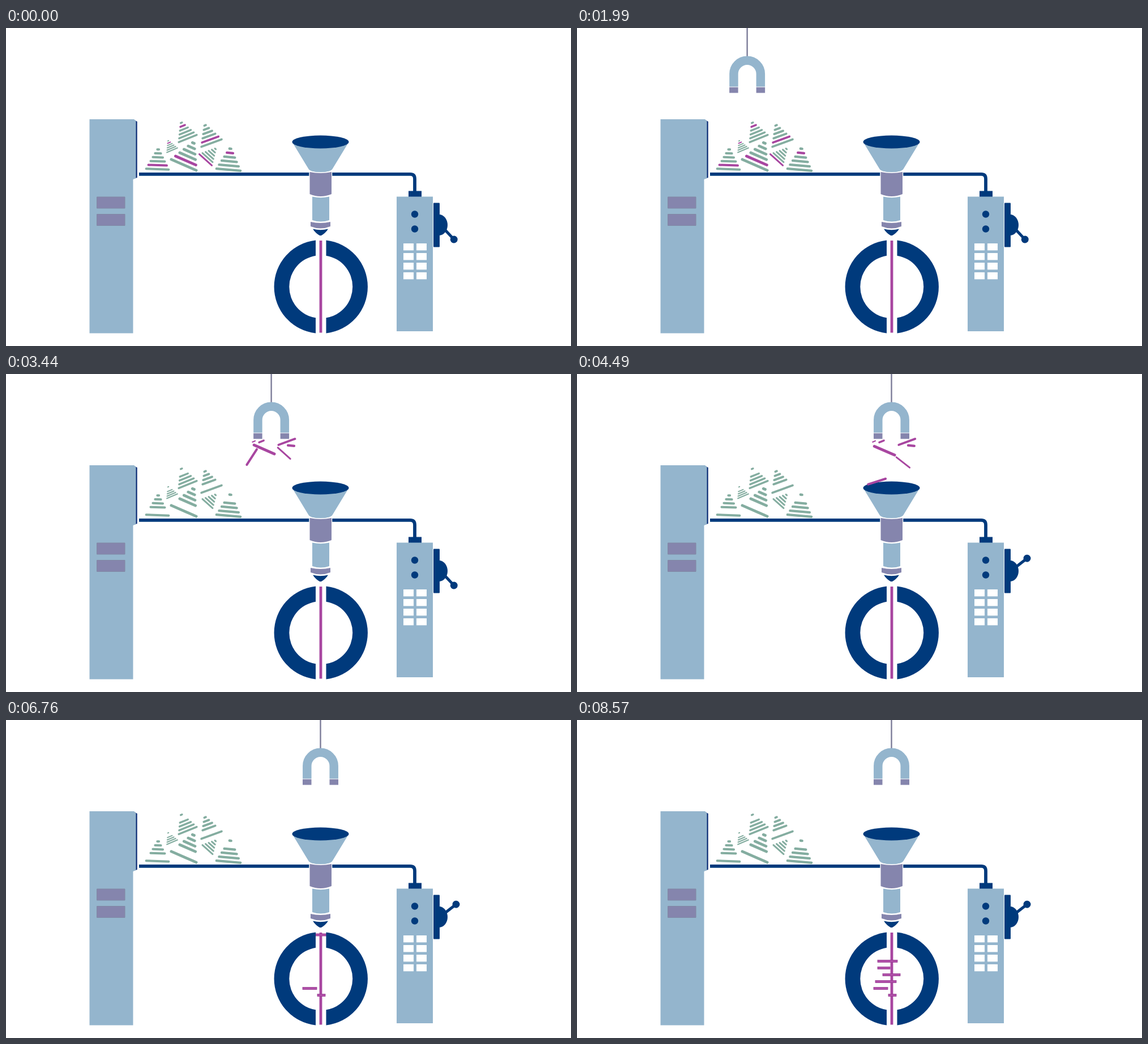
Write an HTML page that moves like this. It is 998 px wide and 561 px high and loops after 8670 ms.

```html
<!DOCTYPE html>
<html lang="en">
<head>
<meta charset="utf-8">
<title>Magnet and funnel</title>
<style>
  html, body { margin: 0; height: 100%; overflow: hidden; background: #fff; }
  svg { display: block; width: 100vw; height: 100vh; }
  .sky { fill: #94b5cd; }
  .navy { fill: #003a7c; }
  .plum { fill: #8585ad; }
  .edge { stroke: #fff; stroke-width: 2.5; paint-order: stroke; }
</style>
</head>
<body>
<svg viewBox="0 0 998 561">
  <!-- hides sticks once they are inside the funnel -->
  <clipPath id="mouth"><path d="M0 0H998V201H605.500A50 11.500 0 0 1 505.500 201H470V561H0Z"/></clipPath>

  <!-- left cabinet -->
  <path fill="#0a2a74" d="M224 161L231.700 165V264L224 266.500Z"/>
  <path class="sky" d="M147.500 161H226L229.500 164V265L224.500 267V538.500H147.500Z"/>
  <path class="plum" stroke="#8088a4" d="M160.500 298H210V318H160.500ZM160.500 328.500H210V348.500H160.500Z"/>

  <!-- pipe and right cabinet -->
  <path d="M235 257.800H714Q722 257.800 722 266V290" fill="none" stroke="#003a7c" stroke-width="5.800"/>
  <path class="navy" d="M711 287.500H734V298H711Z"/>
  <path class="sky" d="M690 297.500H754V535H690Z"/>
  <circle class="navy" cx="722" cy="328.500" r="6.200"/>
  <circle class="navy" cx="722" cy="354.500" r="6.200"/>
  <g id="keys" fill="#fff"></g>
  <rect class="navy" x="755" y="308.500" width="11" height="78" rx="1"/>
  <path class="navy" d="M765 329A15 18.500 0 0 1 765 366Z"/>
  <g id="lever">
    <path d="M767 347H802" stroke="#003a7c" stroke-width="5"/>
    <circle class="navy" cx="802.500" cy="347" r="6.500"/>
  </g>

  <g id="piles" stroke-linecap="round" stroke="#84ada0"></g>

  <!-- magnet -->
  <g id="magnet">
    <path d="M0 0V51" stroke="#80809c" stroke-width="2.500"/>
    <path d="M-23.700 103.500V81A23.700 23.700 0 0 1 23.700 81V103.500" fill="none" stroke="#94b5cd" stroke-width="15.500"/>
    <path class="plum" d="M-31.500 104.500H-16V114.500H-31.500ZM16 104.500H31.500V114.500H16Z"/>
  </g>

  <!-- funnel -->
  <path class="sky" d="M506 202L534 248Q537 254 555.500 254.500Q574 254 577 248L605 202Z"/>
  <ellipse class="navy" cx="555.500" cy="201" rx="50" ry="11.500"/>
  <g clip-path="url(#mouth)"><g id="sticks" stroke-linecap="round" stroke="#a846a0"></g></g>
  <path class="plum edge" d="M536.500 254Q555.500 258 575 254V293Q555.500 301 536.500 293Z"/>
  <path class="sky edge" d="M541 297.500Q556 301 571 297.500V339Q556 344 541 339Z"/>
  <path class="plum edge" d="M538 342Q555.500 346 573 342V350Q555.500 357 538 350Z"/>
  <path class="navy" d="M542 354.500Q555.500 358 569 354.500Q565 361 558 365.500Q555.500 367 553 365.500Q546 361 542 354.500Z"/>

  <!-- ring -->
  <path d="M556 375V537.500" stroke="#a846a0" stroke-width="4.800"/>
  <g id="bars" fill="#b04fa8" stroke="#963c91" stroke-width=".8"></g>
  <path class="navy" d="M547 374.500A82.500 82.500 0 0 0 547 538.500V511.300A55.500 55.500 0 0 1 547 401.700Z
    M565.500 374.500A82.500 82.500 0 0 1 565.500 538.500V511.300A55.500 55.500 0 0 0 565.500 401.700Z"/>
</svg>
<script>
const LOOP = 8670, ROWS = 6, STOP = 329, FUNNEL = 555.5, RAD = Math.PI / 180;
const $ = id => document.getElementById(id);
const add = (parent, tag, attrs) => {
  const el = document.createElementNS('http://www.w3.org/2000/svg', tag);
  for (const k in attrs) el.setAttribute(k, attrs[k]);
  return parent.appendChild(el);
};
const place = (el, x, y, a = 0) => el.setAttribute('transform', `translate(${x} ${y}) rotate(${a})`);
const mix = (a, b, u) => a + (b - a) * u;
const ease = (t, start, span) =>
  (1 - Math.cos(Math.PI * Math.min(1, Math.max(0, (t - start) / span)))) / 2;

for (let i = 0; i < 8; i++)
  add($('keys'), 'rect', { x: 702 + i % 2 * 23, y: 380 + (i >> 1) * 17, width: 18, height: 12.3 });

// piles in the order their pink sticks drop into the funnel
const piles = [
  { x: 267.5, y: 249, tilt: 2, size: 43, pink: 1, swing: -59 },
  { x: 352.5, y: 232.5, tilt: 42, size: 32, pink: 0 },
  { x: 314, y: 241.5, tilt: 23.6, size: 52, pink: 1 },
  { x: 393, y: 250, tilt: 5, size: 46, pink: 4 },
  { x: 363, y: 203, tilt: -20, size: 41, pink: 1 },
  { x: 321, y: 195, tilt: -22, size: 37, pink: 4 },
  { x: 293.5, y: 215.5, tilt: -23, size: 22, pink: 4 }
];

const sticks = piles.map(({ x, y, tilt, size, pink, swing = 0 }, order) => {
  const row = (group, r) => {
    const u = r / (ROWS - 1), rise = size * .81 * u;
    const len = size * mix(1, .14, u), width = size * .093;
    const half = (len - width * .8) / 2;
    const el = add(group, 'path', { d: `M${-half} 0H${half}`, 'stroke-width': width });
    const at = { el, len, x: x + Math.sin(tilt * RAD) * rise, y: y - Math.cos(tilt * RAD) * rise };
    place(el, at.x, at.y, tilt);
    return at;
  };
  for (let r = 0; r < ROWS; r++) if (r !== pink) row($('piles'), r);
  const s = row($('sticks'), pink);
  return {
    ...s, tilt,
    gripX: 36 * Math.tanh((s.x - STOP) / 32),
    gripY: Math.max(119, 146.5 - 6.7 * order),
    gripTilt: tilt + swing,
    lift: s.len > 35 ? 2480 : 2330,   // long sticks start later
    drop: 4200 + order * 113
  };
});

// left and right ends of each settled bar, from the bottom up
const bars = [[550, 564], [524, 549], [527, 564], [540, 571], [531, 553], [531, 566]].map(([l, r], i) => ({
  el: add($('bars'), 'rect', { x: (l - r) / 2, y: -2, width: r - l, height: 4 }),
  x: (l + r) / 2, y: 485.5 - 12 * i,
  start: 5624 + 437 * i + (i > 1 ? 262 : 0)
}));

function draw(t) {
  const mx = mix(-65, STOP, ease(t, 461, 1850)) + (FUNNEL - STOP) * ease(t, 2780, 1150);
  place($('magnet'), mx, 0);
  $('lever').setAttribute('transform', `rotate(${mix(47, -38, ease(t, 3950, 250))} 767 347)`);

  for (const s of sticks) {
    const u = ease(t, s.lift, 400), dt = Math.max(0, t - s.drop);
    const fall = .00051 * dt * dt;
    const x = mx + s.gripX * Math.max(.3, 1 - fall * .0058);
    const tilt = s.gripTilt * Math.max(0, 1 - fall * fall * .00037);
    place(s.el, mix(s.x, x, u), mix(s.y, s.gripY + fall, u), mix(s.tilt, tilt, u * u));
    s.el.style.display = fall > 130 ? 'none' : '';
  }

  for (const b of bars) {
    b.el.style.display = t < b.start ? 'none' : '';
    place(b.el, t < b.start + 499 ? FUNNEL : b.x, mix(379, b.y, ease(t, b.start, 400)));
  }
}

function tick() {
  draw(performance.now() % LOOP);
  requestAnimationFrame(tick);
}
tick();
</script>
</body>
</html>
```
